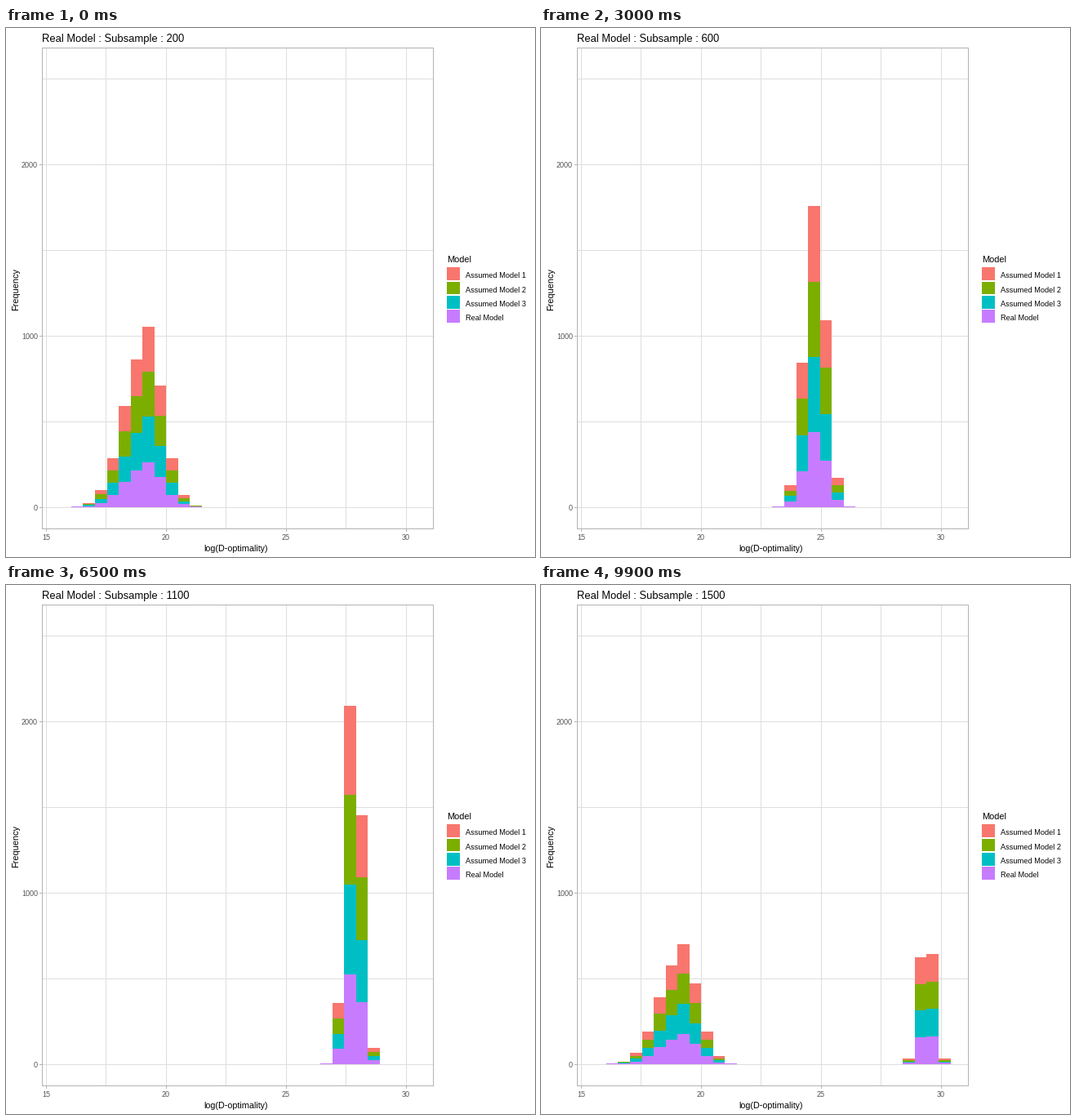
A matplotlib script for the animation above (10000 ms loop, 648 by 648 pixels).

```python
import math

import matplotlib.pyplot as plt
import numpy as np
from matplotlib.animation import FuncAnimation
from matplotlib.patches import Rectangle

plt.rcParams.update({
    "toolbar": "None",
    "font.family": "Liberation Sans",
    "text.hinting": "native",
})

SIZE = 648
BINS = 30
BASE = 587            # pixel row of zero frequency
PX_PER_COUNT = 0.21
LEFT, TOP, RIGHT, BOTTOM = 44, 24, 523, 613
GRID, EDGE, INK = "#DEDEDE", "#B3B3B3", "#4D4D4D"
MODELS = [
    ("Assumed Model 1", "#F8766D"),
    ("Assumed Model 2", "#7CAE00"),
    ("Assumed Model 3", "#00BFC4"),
    ("Real Model", "#C77CFF"),
]
RUNS = 1000           # results per model
SUBSAMPLES = range(200, 1600, 100)

# Key points, in bins, of the bell's centre and its two half widths;
# values between them follow the logarithm of the subsample size
KEY_SIZES = np.log([200, 300, 600, 800, 1100, 1500])
CENTRES = [7.14, 11.42, 18.61, 21.57, 24.83, 28.01]
LEFT_SPREADS = [1.70, 1.32, 0.88, 0.75, 0.62, 0.51]
RIGHT_SPREADS = [1.40, 1.25, 0.82, 0.70, 0.59, 0.505]


def stack_levels(n):
    """Upper level of each model's bar, one row per model."""
    centre, left, right = (np.interp(math.log(n), KEY_SIZES, values)
                           for values in (CENTRES, LEFT_SPREADS, RIGHT_SPREADS))
    offset = np.arange(BINS + 1) - centre
    z = offset / np.where(offset < 0, left, right)
    cdf = [0.5 * math.erfc(-v / math.sqrt(2)) for v in z]
    counts = RUNS * np.diff(cdf)
    counts[counts < 0.8] = 0
    return np.outer([4, 3, 2, 1], counts)


def build_schedule():
    """One (state, share of next state, title state) entry per frame."""
    count = len(SUBSAMPLES)
    frames = []
    for i in range(count):
        steps = 4 if i < 3 else 3
        after = (i + 1) % count
        frames += [(i, 0, i)] * 4
        for s in range(1, steps + 1):
            frames.append((i, s / steps, after if s > math.ceil(steps / 2) else i))
    return frames[:-1]


STATES = [stack_levels(n) for n in SUBSAMPLES]
SCHEDULE = build_schedule()

fig = plt.figure(figsize=(9, 9), dpi=72, facecolor="white")
ax = fig.add_axes([0, 0, 1, 1])
ax.set_xlim(0, SIZE)
ax.set_ylim(SIZE, 0)
ax.axis("off")


def box(x, y, w, h, color, z=1):
    ax.add_patch(Rectangle((x, y), w, h, facecolor=color, linewidth=0,
                           antialiased=False, zorder=z))


def label(x, y, text, size, color="black", va="baseline", **kw):
    return ax.text(x, y, text, fontsize=size, color=color, va=va, **kw)


def draw_panel():
    for i in range(7):
        box(49 + 147 * i // 2, TOP, 1, BOTTOM - TOP, GRID)
    for y in range(62, 588, 105):
        box(LEFT, y, RIGHT - LEFT, 1, GRID)
    for x in (LEFT, RIGHT):
        box(x, TOP, 1, BOTTOM - TOP + 1, EDGE, 4)
    for y in (TOP, BOTTOM):
        box(LEFT, y, RIGHT - LEFT + 1, 1, EDGE, 4)
    for i in range(4):
        x = 49 + 147 * i
        box(x, BOTTOM, 1, 4, EDGE)
        label(x, 627, str(15 + 5 * i), 9, INK, ha="center")
    for i in range(3):
        y = BASE - 210 * i
        box(LEFT - 3, y, 3, 1, EDGE)
        label(39, y + 4, str(1000 * i), 9, INK, ha="right")
    label(282, 641, "log(D-optimality)", 10.7, ha="center")
    label(17, 320, "Frequency", 11, va="center", ha="right", rotation=90)


def draw_legend():
    label(540, 287, "Model", 11)
    for i, (name, color) in enumerate(MODELS):
        y = 293.4 + 17.25 * i
        top = round(y)
        box(540, top, 16, round(y + 15.65) - top, color)
        label(563, top + 13, name, 9.25)


draw_panel()
draw_legend()
title = label(44, 17, "", 13)

edges = np.floor(65.35 + 14.54 * np.arange(BINS + 1) + 0.5)
layers = [
    ax.bar(edges[:-1], np.zeros(BINS), np.diff(edges), bottom=BASE, align="edge",
           color=color, linewidth=0, antialiased=False, zorder=2 + 0.1 * i)
    for i, (_, color) in enumerate(MODELS)
]


def update(frame):
    state, share, named = SCHEDULE[frame]
    after = STATES[(state + 1) % len(STATES)]
    levels = (1 - share) * STATES[state] + share * after
    heights = np.maximum(1, np.floor(levels * PX_PER_COUNT + 0.5))
    for bars, row, level in zip(layers, heights, levels):
        for bar, h, count in zip(bars, row, level):
            bar.set_height(-h)
            bar.set_visible(count > 0)
    title.set_text(f"Real Model : Subsample : {SUBSAMPLES[named]}")
    return [title]


anim = FuncAnimation(fig, update, frames=len(SCHEDULE), interval=100,
                     init_func=lambda: update(0), repeat=True, repeat_delay=0,
                     blit=False)
plt.show()
```
